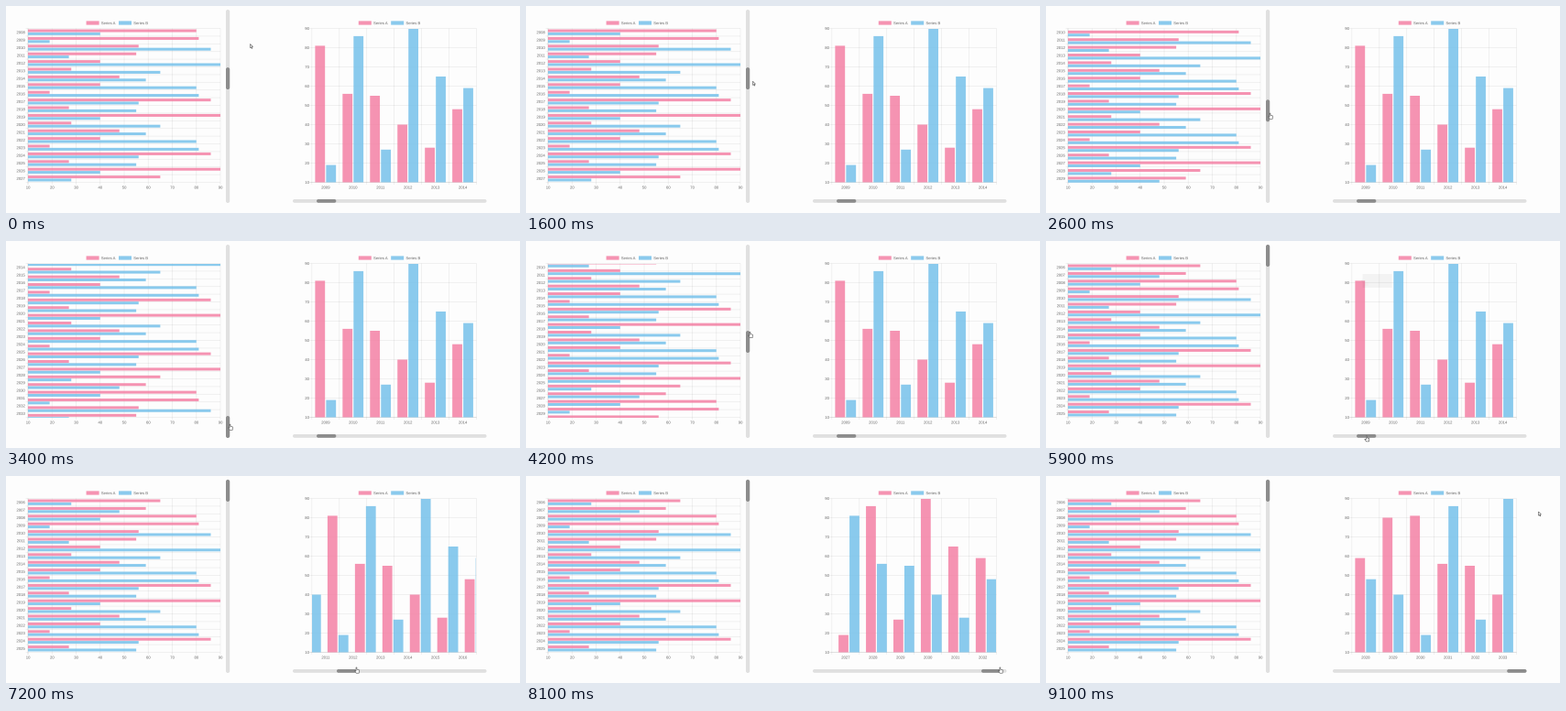
A matplotlib script that plays this animation: 561 by 226 pixels, repeating every 9.2 s.

```python
import numpy as np
import matplotlib
import matplotlib.pyplot as plt
from matplotlib.animation import FuncAnimation
from matplotlib.patches import FancyBboxPatch, PathPatch, Polygon, Rectangle
from matplotlib.textpath import TextPath
from matplotlib.transforms import Affine2D

W, H, DPI = 561, 226, 64
PT = 72 / DPI
STEP, FRAMES, DT = 100, 92, 10
TIMES = np.arange(0, STEP * FRAMES + DT, DT)
FIRST_YEAR, SHOWN_FROM = 2006, 2
PINK, BLUE, GREY = "#f4799f", "#6ebeea", "#666666"
FONT = 4.2
LEAD = 40  # the pointer runs this many ms ahead of the thumb

matplotlib.rcParams["font.family"] = "Liberation Sans"

P = [65, 59, 80, 81, 56, 55, 40]
Q = [28, 48, 40, 19, 86, 27, 90]
SERIES_A = P + Q + Q + P
SERIES_B = Q + P + P + Q

# Thumb drags: start ms, end ms, from category, to category, grip on the thumb
LEFT_DRAGS = [(2263, 3363, 2.7, 8, 10), (3705, 4700, 8, 0, 10)]
RIGHT_DRAGS = [(6490, 6830, 3.01, 0, 11), (6838, 8150, 0, 22, 15)]
# Free pointer stops between the drags: ms, x, y
STOPS = [(0, 266.5, 41.5), (150, 266.5, 41.5), (300, 259.5, 115),
         (800, 259.5, 115), (1800, 244.5, 74), (4980, 243, 8),
         (5600, 343, 150), (5850, 349.5, 213), (8400, 548, 185),
         (8700, 552, 100), (9000, 537.5, 39)]


def ease(u):
    u = np.clip(u, 0, 1)
    return u - 0.15 * np.sin(2 * np.pi * u) / (2 * np.pi)


def scroll_at(drags, t):
    """First visible category, as a real number, at time t."""
    pos = drags[0][2]
    for start, end, a, b, _ in drags:
        pos = pos + (b - a) * ease((t - start) / (end - start))
    return pos


def left_thumb_y(t):
    return 4 + scroll_at(LEFT_DRAGS, t) * 187 / 8


def right_thumb_x(t):
    return 313 + scroll_at(RIGHT_DRAGS, t) * 190.2 / 22


def pointer_path():
    path = list(STOPS)
    for drags, vertical in ((LEFT_DRAGS, True), (RIGHT_DRAGS, False)):
        for start, end, _, _, grip in drags:
            for t in range(start, end, DT):
                path.append((t, 244, left_thumb_y(t + LEAD) + grip) if vertical
                            else (t, right_thumb_x(t + LEAD) + grip, 209))
    return np.array(sorted(path)).T


def bar_offsets(scroll):
    """One second quartic ease to the first category, restarted by each scroll."""
    pos = start = goal = np.floor(scroll[0])
    age, out = 1.0, []
    for before, now in zip(np.r_[scroll[0], scroll], scroll):
        if now != before:
            start, goal, age = pos, np.floor(now + 1e-9), 0.0
        age = min(1.0, age + DT / 1000)
        pos = goal - (goal - start) * (1 - age) ** 4
        out.append(pos)
    return out


fig = plt.figure(figsize=(W / DPI, H / DPI), dpi=DPI, facecolor="#fdfdfd")
ax = fig.add_axes([0, 0, 1, 1])
ax.set_xlim(0, W)
ax.set_ylim(H, 0)
ax.axis("off")


def rect(x, y, w, h, color, **kw):
    return ax.add_patch(Rectangle((x, y), w, h, fc=color, lw=0, snap=False, **kw))


def pill(x, y, w, h, color, z):
    style = f"round,pad=0,rounding_size={min(w, h) / 2}"
    return ax.add_patch(FancyBboxPatch((x, y), w, h, fc=color, lw=0, snap=False,
                                       zorder=z, boxstyle=style))


def text_path(x, y, text, align, weight="normal"):
    """Outline of text centred on y; align is 0 left, 0.5 centre, 1 right."""
    path = TextPath((0, 0), text, size=FONT, prop={"weight": weight})
    shift = x - align * path.get_extents().x1
    return path.transformed(Affine2D().scale(1, -1).translate(shift, y + 0.36 * FONT))


def label(x, y, text, align=0.5, color=GREY, z=4, weight="normal"):
    return ax.add_patch(PathPatch(text_path(x, y, text, align, weight),
                                  fc=color, lw=0, snap=False, zorder=z))


def line(x0, y0, x1, y1, alpha=0.07):
    ax.plot([x0, x1], [y0, y1], color="black", alpha=alpha, lw=0.7 * PT,
            snap=False, zorder=1, solid_capstyle="butt")


def legend(x):
    for dx, color, name in ((0, PINK, "Series A"), (35.4, BLUE, "Series B")):
        rect(x + dx, 16.4, 14, 4.2, color, alpha=0.8, zorder=2)
        label(x + dx + 16.2, 18.6, name, 0)


class Chart:
    """Two-series bar chart with a scrolling category axis."""

    def __init__(self, x0, x1, rows, horizontal, drags):
        self.x0, self.x1, self.y0, self.y1 = x0, x1, 24.5, 192.5
        self.horizontal, self.rows = horizontal, rows
        self.scroll = scroll_at(drags, TIMES)
        self.offset = bar_offsets(self.scroll)
        self.origin = self.y0 if horizontal else x0
        self.size = ((self.y1 - self.y0) if horizontal else (x1 - x0)) / rows
        self.draw_grid()
        self.names = [label(0, 0, "0") for _ in range(rows)]
        self.bars = [(i + 0.12 + 0.4 * side, self.bar(v, color))
                     for side, (vals, color) in enumerate(((SERIES_A, PINK),
                                                           (SERIES_B, BLUE)))
                     for i, v in enumerate(vals)]

    def draw_grid(self):
        x0, x1, y0, y1 = self.x0, self.x1, self.y0, self.y1
        for i in range(9):
            alpha = 0.07 if i else 0.16
            if self.horizontal:
                x = x0 + i / 8 * (x1 - x0)
                line(x, y0, x, y1 + 2.5, alpha)
                label(x, 198, str(10 + 10 * i))
            else:
                y = y1 - i / 8 * (y1 - y0)
                line(x0 - 2.5, y, x1, y, alpha)
                label(x0 - 3, y, str(10 + 10 * i), 1)
        for i in range(self.rows + 1):
            p = self.origin + i * self.size
            if self.horizontal:
                line(x0 - 2.5, p, x1, p)
            else:
                line(p, y0, p, y1 + 2.5)

    def bar(self, value, color):
        f = (value - 10) / 80
        thick = self.size * 0.36
        if self.horizontal:
            box = (self.x0, 0, f * (self.x1 - self.x0), thick)
        else:
            h = f * (self.y1 - self.y0)
            box = (0, self.y1 - h, thick, h)
        patch = rect(*box, color, alpha=0.8, zorder=2)
        patch.set_clip_path(Rectangle((self.x0, self.y0), self.x1 - self.x0,
                                      self.y1 - self.y0, transform=ax.transData))
        return patch

    def update(self, k):
        first = FIRST_YEAR + int(self.scroll[k] + 1e-9)
        for i, name in enumerate(self.names):
            mid = self.origin + (i + 0.5) * self.size
            at = (self.x0 - 3.4, mid, str(first + i), 1) if self.horizontal \
                else (mid, 198, str(first + i), 0.5)
            name.set_path(text_path(*at))
        for slot, patch in self.bars:
            p = self.origin + self.size * (slot - self.offset[k])
            (patch.set_y if self.horizontal else patch.set_x)(p)


left = Chart(24, 234, 20, True, LEFT_DRAGS)
right = Chart(333.8, 513.5, 6, False, RIGHT_DRAGS)
legend(87.6)
legend(384.8)

pill(240, 4, 4.2, 211, "#e0e0e0", 3)
pill(313, 211, 211.5, 3.8, "#e0e0e0", 3)
left_thumb = pill(240, 4, 4.2, 24, "#8c8c8c", 4)
right_thumb = pill(313, 211, 21.3, 3.8, "#8c8c8c", 4)

tooltip = [
    rect(345.6, 36, 32, 15, "black", zorder=6),
    ax.add_patch(Polygon([(343.4, 43.4), (345.6, 41.6), (345.6, 45.2)],
                         fc="black", lw=0, zorder=6)),
    rect(347.8, 45, 4, 4, PINK, zorder=7),
    label(347.8, 40.2, "2009", 0, "white", 7, "bold"),
    label(353, 47, "Series A: 81", 0, "white", 7),
]

ARROW = np.array([(0, 0), (0, 4.2), (1, 3.4), (1.7, 4.9), (2.4, 4.6),
                  (1.8, 3.1), (3, 3)])
HAND = np.array([(0, 0), (0.9, 0), (1, 2.2), (3.4, 2.8), (3.2, 6.2),
                 (0.2, 6.2), (-1.6, 3.6), (0, 4)])
pointer = ax.add_patch(Polygon(ARROW, fc="white", ec="#555555", lw=0.6 * PT,
                               snap=False, zorder=9))
path_t, path_x, path_y = pointer_path()


def update(n):
    t = n * STEP
    left.update(t // DT)
    right.update(t // DT)
    left_thumb.set_y(left_thumb_y(t))
    right_thumb.set_x(right_thumb_x(t))

    fade_in = np.clip((t - 5400) / 200, 0, 1)
    fade_out = 1 - np.clip((t - 5600) / 400, 0, 1)
    for part in tooltip:
        part.set_alpha(0.65 * fade_in * fade_out ** 2)

    tip = np.array([np.interp(t, path_t, path_x), np.interp(t, path_t, path_y)])
    on_scrollbar = 239 < tip[0] < 247 or tip[1] > 206
    pointer.set_xy((HAND if on_scrollbar else ARROW) + tip)
    return []


anim = FuncAnimation(fig, update, frames=FRAMES, interval=STEP, repeat=True,
                     repeat_delay=0, init_func=lambda: update(0), blit=False)
plt.show()
```
